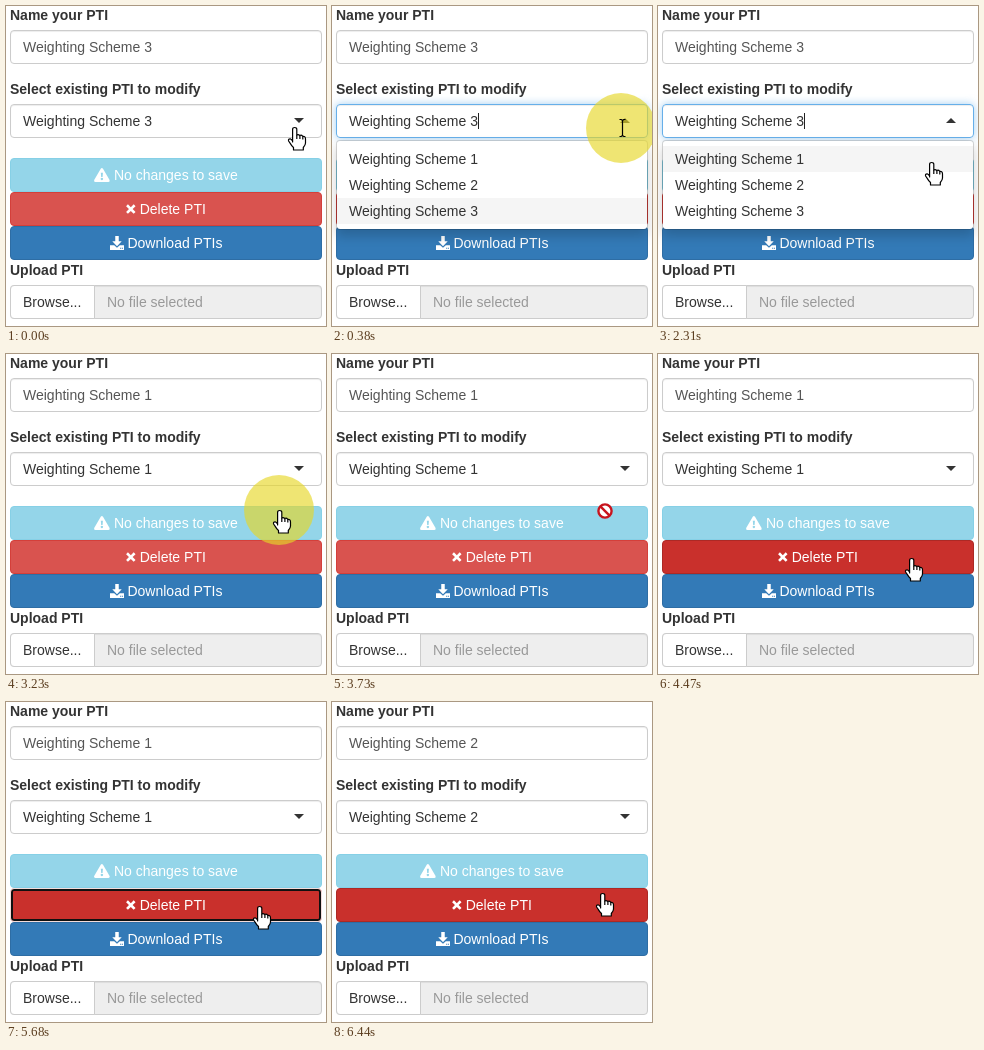
These frames come from a looping animation (320x320 px, 7.37 s). An HTML page:

```html
<!DOCTYPE html>
<html lang="en">
<head>
<meta charset="utf-8">
<title>PTI weighting schemes</title>
<style>
  * { box-sizing: border-box; }
  html, body { margin: 0; width: 100%; height: 100%; overflow: hidden; background: #fff; }
  body { position: relative; font: 14px/20px "Liberation Sans", Arial, sans-serif; color: #333; }
  #stage { position: absolute; left: 0; top: 0; width: 320px; height: 320px; overflow: hidden; cursor: default; }
  #stage > * { position: absolute; white-space: nowrap; }
  b { left: 4px; }
  .box, .btn { left: 4px; width: 312px; height: 34px; padding: 6px 12px; border: 1px solid #ccc; border-radius: 4px; }
  .box { box-shadow: inset 0 1px 1px rgba(0,0,0,.075); }
  #name { top: 24px; color: #555; }
  #select { top: 98px; }
  #select::after { content: ""; position: absolute; left: 283px; top: 13px; border: 5px solid transparent; border-top-color: #333; border-bottom: 0; }
  .open #select { border-color: #66afe9; box-shadow: inset 0 1px 1px rgba(0,0,0,.075), 0 0 8px rgba(102,175,233,.6); }
  .open #select::after { border-top: 0; border-bottom: 5px solid #333; }
  .open #select span { border-right: 1px solid #222; }

  #menu { display: none; left: 4px; top: 134px; width: 312px; height: 90px; padding: 5px 0; background: #fff; border: 1px solid rgba(0,0,0,.15); border-radius: 4px; box-shadow: 0 6px 12px rgba(0,0,0,.175); background-clip: padding-box; }
  .open #menu { display: block; }
  #menu div { height: 26px; padding: 3px 12px; }
  #menu .hot { background: #f5f5f5; }

  .btn { color: #fff; text-align: center; }
  .btn svg { height: 14px; vertical-align: -1.75px; fill: #fff; fill-rule: evenodd; overflow: visible; }
  #save { top: 152px; background: #5bc0de; border-color: #46b8da; opacity: .65; }
  #delete { top: 186px; background: #d9534f; border-color: #d43f3a; }
  #delete.hover, #delete.focus { background: #c9302c; border-color: #ac2925; }
  #delete.press { background: #ac2925; border-color: #761c19; }
  #delete.focus, #delete.press { border-color: #f3dcdb; box-shadow: inset 0 0 0 2px #101010; }
  #download { top: 220px; background: #337ab7; border-color: #2e6da4; }

  #file { top: 279px; background: #eee; color: #999; padding-left: 96px; }
  #browse { top: 279px; width: 85px; background: #fff; border-radius: 4px 0 0 4px; box-shadow: none; }

  #pointer { left: 0; top: 0; width: 320px; height: 320px; }
</style>
</head>
<body>
<div id="stage">
  <b style="top:-1px">Name your PTI</b>
  <div class="box" id="name"></div>
  <b style="top:73px">Select existing PTI to modify</b>
  <div class="box" id="select"><span></span></div>

  <div class="btn" id="save"><svg width="15.75" viewBox="0 0 18 16"><path d="M7.7 .8Q9-.8 10.3 .8L17.8 13.7Q18.5 15.8 16.5 16H1.5Q-.5 15.8 .2 13.7ZM7.8 5.3L8.2 10.2H9.8L10.2 5.3ZM9 11.1a1.4 1.4 0 1 0 .01 0Z"/></svg> No changes to save</div>
  <div class="btn" id="delete"><svg width="9.63" viewBox="0 0 11 16"><path d="M2.2 2.7L5.5 6 8.8 2.7 10.9 4.8 7.6 8.1 10.9 11.4 8.8 13.5 5.5 10.2 2.2 13.5 .1 11.4 3.4 8.1 .1 4.8Z"/></svg> Delete PTI</div>
  <div class="btn" id="download"><svg width="14" viewBox="0 0 16 16"><path d="M6 0H10V6H13.4L8 11.6 2.6 6H6ZM0 10.6H4.8L8 13.4 11.2 10.6H16V16H0ZM11.6 13.5v1.2h1.2v-1.2ZM13.6 13.5v1.2h1.2v-1.2Z"/></svg> Download PTIs</div>

  <b style="top:254px">Upload PTI</b>
  <div class="box" id="file">No file selected</div>
  <div class="box" id="browse">Browse...</div>

  <div id="menu">
    <div>Weighting Scheme 1</div>
    <div>Weighting Scheme 2</div>
    <div>Weighting Scheme 3</div>
  </div>

  <svg id="pointer" viewBox="0 0 320 320">
    <g id="spot">
      <circle id="ring" cx="-1" r="35" fill="#e6d828" fill-opacity=".65"/>
      <g id="hand" fill="#fff" stroke="#000" stroke-width="1.2" stroke-linejoin="round">
        <path d="M-2.4 15V2.5Q-2.4.5-.3.5T1.8 2.5V8Q3.2 6.8 4.9 8.6 6.3 7.6 7.8 9.4 10.5 9 10.5 12V16Q10.5 18 8.3 20.5V23H-1.5V20.5Q-3.5 18.6-4.6 16.6L-6.4 14Q-7 11.8-4.9 11.8-3.6 12.2-2.4 14Z"/>
        <path d="M1.8 8V12M4.9 8.8V12M7.8 9.6V12.6" fill="none"/>
      </g>
      <path id="beam" d="M-2.5-8.5H-.8L.5-7.5 1.8-8.5H3.5M.5-7.5V7.5M-2.5 8.5H-.8L.5 7.5 1.8 8.5H3.5" fill="none" stroke="#000" stroke-width="1.2"/>
      <g id="deny" fill="#fff" stroke="#c8141e" stroke-width="2.4">
        <circle r="6.6"/>
        <path d="M-4.6-4.6L4.6 4.6"/>
      </g>
    </g>
  </svg>
</div>
<script>
const LOOP = 7370;
const $ = id => document.getElementById(id);

// start ms, pointer, x, y, scheme, highlighted option (0 = closed), delete state, click ring
const steps = [
  [0,    "hand", 289, 121, 3, 0, "", 0],
  [380,  "beam", 290, 122, 3, 3, "", 1],
  [1310, "beam", 290, 122, 3, 3, "", 0],
  [1570, "beam", 288, 128, 3, 3, "", 0],
  [1810, "hand", 282, 143, 3, 1, "", 0],
  [2060, "hand", 277, 152, 3, 1, "", 0],
  [2310, "hand", 274, 156, 3, 1, "", 0],
  [3230, "hand", 274, 156, 1, 0, "", 1],
  [3480, "hand", 274, 156, 1, 0, "", 0],
  [3730, "deny", 273, 157, 1, 0, "", 0],
  [3990, "hand", 262, 192, 1, 0, "hover", 0],
  [4470, "hand", 254, 204, 1, 0, "hover", 0],
  [4730, "hand", 254, 204, 1, 0, "press", 1],
  [5680, "hand", 254, 204, 1, 0, "focus", 0],
  [5930, "hand", 254, 204, 2, 0, "focus", 0],
  [6190, "hand", 262, 198, 2, 0, "hover", 0],
  [6440, "hand", 271, 191, 2, 0, "hover", 0],
];

const show = (id, on) => $(id).style.display = on ? "" : "none";

function draw([, pointer, x, y, scheme, option, state, click]) {
  const text = "Weighting Scheme " + scheme;
  $("name").textContent = text;
  $("select").firstChild.textContent = text;
  $("stage").className = option ? "open" : "";
  [...$("menu").children].forEach((el, i) => el.className = i + 1 === option ? "hot" : "");
  $("delete").className = "btn " + state;
  $("spot").setAttribute("transform", `translate(${x} ${y})`);
  for (const id of ["hand", "beam", "deny"]) show(id, id === pointer);
  show("ring", click);
}

let current;
function tick() {
  const t = performance.now() % LOOP;
  const step = steps.findLast(s => s[0] <= t);
  if (step !== current) draw(current = step);
  requestAnimationFrame(tick);
}
tick();
</script>
</body>
</html>
```
